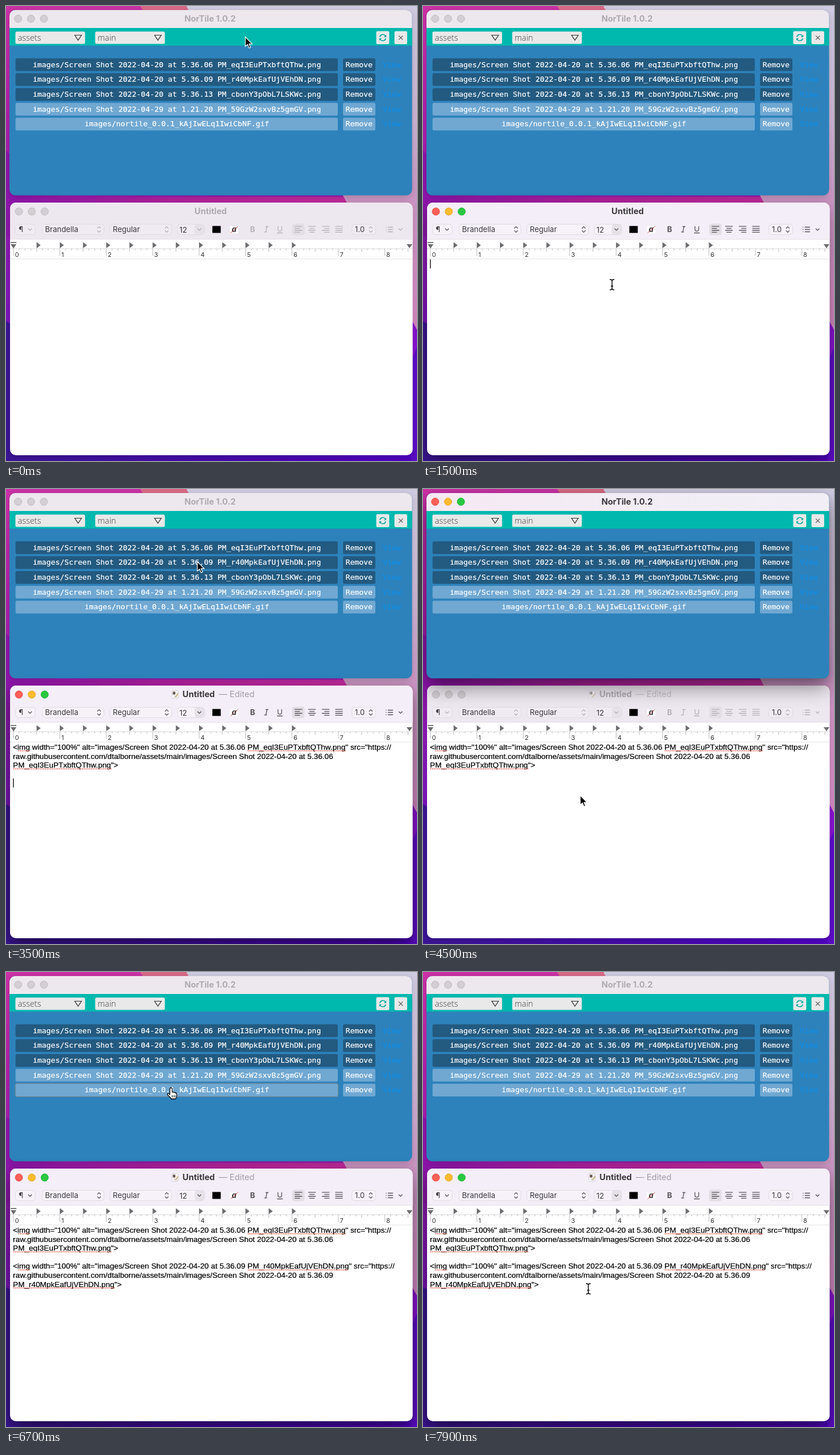
Recreate the animation shown at these times as an HTML page. Size 711x787 px, loop 8 s.

```html
<!DOCTYPE html>
<html lang="en">
<head>
<meta charset="utf-8">
<title>File list and editor</title>
<style>
html, body { margin: 0; width: 100%; height: 100%; overflow: hidden; }
svg { display: block; width: 100vw; height: 100vh; }
text { white-space: pre; }
.ui { font: 13px Inter, sans-serif; fill: #3b383d; }
.title { font: 700 14.5px Inter, sans-serif; fill: #aeaab0; }
.on .title { fill: #3b393d; }
.edited { font: 400 14.6px Inter, sans-serif; fill: #c3bec6; }
.on .edited { fill: #a19ca5; }
.combo { font: 300 14.3px "Open Sans", sans-serif; fill: #3c3c3c; }
.mono { font: 12.95px "DejaVu Sans Mono", monospace; fill: #fff; stroke: #fff; stroke-width: .2; }
.view { fill: #0a90f0; stroke: none; }
.num { font: 11px Inter, sans-serif; fill: #333; }
.doc { font: 13.38px "Liberation Sans", sans-serif; fill: #000; stroke: #000; stroke-width: .22; }
.bar { fill: #ece8ed; }
.on .bar { fill: url(#glass); }
.tools { fill: #ede7f0; }
.on .tools { fill: #f4eef8; }
.light { fill: #d3ced3; stroke: #bcb7bd; stroke-width: .8; }
.on .l0 { fill: #ff5f57; stroke: #e2463f; }
.on .l1 { fill: #febc2e; stroke: #e0a020; }
.on .l2 { fill: #28c840; stroke: #1aab29; }
.box { fill: #f0eaf2; stroke: #e0dae3; }
.on .box { fill: #f7f2fa; }
.pen { fill: none; stroke: #b7b1ba; stroke-width: 1.3; stroke-linecap: round; stroke-linejoin: round; }
.on .pen { stroke: #59555c; }
.bold { font: 700 13px Inter, sans-serif; fill: #b7b1ba; }
.on .bold { fill: #59555c; }
.dots { fill: none; stroke: #ef5d50; stroke-width: 2; stroke-linecap: round; stroke-dasharray: 0 3.05; }
.icon { opacity: .5; }
.on .icon { opacity: 1; }
</style>
</head>
<body>
<svg id="stage" viewBox="0 0 711 787" preserveAspectRatio="none"></svg>
<script>
const stage = document.getElementById('stage');
const LOOP = 8000, STEP = 100;
const LINE = 15.6, TEXT_X = 12.5, BASE = 450.9;

const range = (n, fn) => Array.from({ length: n }, (_, i) => fn(i)).join('');
const rect = (x, y, w, h, fill, r = 0, more = '') =>
  `<rect x="${x}" y="${y}" width="${w}" height="${h}" rx="${r}" fill="${fill}" ${more}/>`;
const box = (x, y, w, h) => `<rect class="box" x="${x}" y="${y}" width="${w}" height="${h}" rx="5"/>`;
const text = (cls, x, y, s, more = '') => `<text class="${cls}" x="${x}" y="${y}" ${more}>${s}</text>`;
const path = (d, more) => `<path d="${d}" ${more}/>`;
const pen = d => path(d, 'class="pen"');
const mid = 'text-anchor="middle"';
const lights = (x, y) => range(3, i => `<circle class="light l${i}" cx="${x + i * 22.3}" cy="${y}" r="6.4"/>`);
const down = (x, y = 386.5) => pen(`M${x - 2.8} ${y - 1.3}l2.8 2.8 2.8-2.8`);
const upDown = x => pen(`M${x - 2.6} 384.2l2.6-2.6 2.6 2.6M${x - 2.6} 388.8l2.6 2.6 2.6-2.6`);

const backdrop = `
<defs>
  <linearGradient id="left" x2="0" y2="1">
    <stop offset="0" stop-color="#cb32a6"/><stop offset=".25" stop-color="#ad1fab"/>
    <stop offset=".42" stop-color="#9a1cb0"/><stop offset=".7" stop-color="#7a14bc"/>
  </linearGradient>
  <linearGradient id="gap" x2="1" y2="0">
    <stop offset="0" stop-color="#8d15ac"/><stop offset=".5" stop-color="#b3229f"/><stop offset="1" stop-color="#c32c9c"/>
  </linearGradient>
  <linearGradient id="right" x2="0" y2="1">
    <stop offset="0" stop-color="#cfcbe0"/><stop offset=".35" stop-color="#cbb2d0"/>
    <stop offset=".6" stop-color="#c994c1"/><stop offset="1" stop-color="#cf84bd"/>
  </linearGradient>
  <linearGradient id="low" x2="1" y2="0">
    <stop offset="0" stop-color="#3b1595"/><stop offset="1" stop-color="#5000c0"/>
  </linearGradient>
  <linearGradient id="glass">
    <stop offset="0" stop-color="#f6e9f4"/><stop offset=".5" stop-color="#f2edf4"/><stop offset="1" stop-color="#f1eff5"/>
  </linearGradient>
  <filter id="blur" x="-20%" y="-30%" width="140%" height="160%"><feGaussianBlur stdDeviation="17"/></filter>
  <filter id="soft" x="-20%" y="-30%" width="140%" height="160%"><feGaussianBlur stdDeviation="6"/></filter>
</defs>
${rect(0, 0, 711, 787, 'url(#left)')}
${path('M0 250L90 330H600V400H0z', 'fill="url(#gap)"')}
${path('M232 0H320L345 60H270z', 'fill="#d96a87"')}
${path('M312 0H711V560L583 328L420 200z', 'fill="url(#right)"')}
${path('M690 520L711 562V787H600z', 'fill="#8412cd"')}
${path('M711 590L690 640V787H711z', 'fill="#5a0cc4"')}
${path('M0 545L40 570L700 700V787H0z', 'fill="url(#low)"')}`;

const shadow = (id, y, h) =>
  rect(7, y + 3, 695, h, '#000', 10, 'opacity=".17" filter="url(#soft)"') +
  rect(7, y + 16, 695, h, '#000', 10, `id="${id}" opacity="0" filter="url(#blur)"`);

// Upper window
const shot = s => `images/Screen Shot 2022-04-${s}.png`;
const files = [
  shot('20 at 5.36.06 PM_eqI3EuPTxbftQThw'),
  shot('20 at 5.36.09 PM_r40MpkEafUjVEhDN'),
  shot('20 at 5.36.13 PM_cbonY3pObL7LSKWc'),
  shot('29 at 1.21.20 PM_59GzW2sxvBz5gmGV'),
  'images/nortile_0.0.1_kAjIwELq1IwiCbNF.gif'
];
const rowY = i => 90.6 + i * 25.65;
const row = (name, i) => {
  const y = rowY(i), fill = i < 3 ? '#235a80' : '#70a8d2';
  return rect(16.5, y, 557.5, 22, fill, 2.5) + rect(583, y, 56, 22, fill, 2.5) +
    text('mono', 295.7, y + 15.2, name, mid) + text('mono', 610.8, y + 15.2, 'Remove', mid) +
    text('mono view', 652, y + 15.2, 'View');
};
const combo = (x, label) => rect(x + .3, 44.3, 120.5, 21.2, '#e9e9e9', 2.5) + text('combo', x + 4.5, 60, label) +
  path(`M${x + 103} 50.5h11.6l-5.8 8.6z`, 'fill="none" stroke="#333" stroke-width="1.2"');
const upper = `
${rect(6, 7, 696.5, 320.5, '#2d82bb', 10)}
${path('M6 38.5V17a10 10 0 0 1 10-10H692.5a10 10 0 0 1 10 10V38.5z', 'class="bar"')}
${rect(6, 38, 696.5, 30.5, '#00b9ae')}
${lights(21, 22)}
${text('title', 353, 27, 'NorTile 1.0.2', mid)}
${combo(16, 'assets')}${combo(154, 'main')}
${rect(640.5, 43.5, 22.5, 22.5, '#e9e9e9', 2.5)}${rect(672, 43.5, 22, 22.5, '#e9e9e9', 2.5)}
${path('M646.6 53.5a5.3 5.3 0 0 1 9.6-1.8M657 56a5.3 5.3 0 0 1-9.6 1.8', 'fill="none" stroke="#00a99f" stroke-width="1.5"')}
${path('M657.8 49.5v4.2h-4.2zM645.8 60v-4.2h4.2z', 'fill="#00a99f"')}
${path('M679.5 51.3l7 7m0-7l-7 7', 'stroke="#555" stroke-width="1.2"')}
${files.map(row).join('')}
${rect(16, 0, 558.5, 23, 'none', 3, 'id="hover" stroke="#7f878d"')}`;

// Editor window
const tick = i => {
  const major = i % 8 === 0, half = i % 4 === 0;
  return `M${(12.8 + i * 10.04).toFixed(1)} 420v${major ? 12 : half ? 5 : 2.5}`;
};
const align = (x, widths, side) => pen(widths.map((w, i) =>
  `M${x + (12 - w) * side} ${381.2 + i * 3.4}h${w}`).join(''));
const ragged = [12, 8, 12, 8];
const note = (n, time, id) => [
  `&lt;img width="100%" alt="images/Screen Shot 2022-04-20 at 5.36.${time} PM_${id}.png" src="https://`,
  `raw.githubusercontent.com/dtalborne/assets/main/images/Screen Shot 2022-04-20 at 5.36.${time}`,
  `PM_${id}.png"&gt;`
].map((s, i) => text('doc', 12, BASE + (n + i) * LINE, s)).join('');
const dots = (n, right, end) => {
  const y = BASE + n * LINE + 1.9;
  return path(`M22 ${y}H42M419 ${y}H${right}M13.5 ${y + 2 * LINE}H${end}`, 'class="dots"');
};
const editor = `
${rect(7, 340, 696.5, 437, '#fff', 10)}
${path('M7 403.5V350a10 10 0 0 1 10-10H693.5a10 10 0 0 1 10 10V403.5z', 'class="tools"')}
${rect(7, 403, 696.5, .8, '#e2dde4')}
${lights(22.3, 355.5)}
<g id="plain">${text('title', 354, 360, 'Untitled', mid)}</g>
<g id="changed">
  <g class="icon">${rect(287, 348.5, 10.5, 13.5, '#fff', 1, 'stroke="#c9c4cb" stroke-width=".8"')}
  ${rect(288.5, 350.5, 4.5, 5, '#6b5b52')}${path('M290 358h6M290 360h6', 'stroke="#b9b4bb" stroke-width=".8"')}
  ${path('M292.5 359l5-6 1.2 1-5 6z', 'fill="#c8a45c"')}</g>
  ${text('title', 305.3, 360, 'Untitled')}${text('edited', 368, 360, '— Edited')}
</g>
${box(16.5, 377.5, 34, 18)}${text('ui', 22, 391, '¶')}${down(41.5)}
${box(62.5, 377.5, 107, 18)}${text('ui', 67.5, 391, 'Brandella')}${upDown(161)}
${box(179.5, 377.5, 107, 18)}${text('ui', 184.8, 391, 'Regular')}${upDown(278)}
${box(296.5, 377.5, 47, 18)}${rect(326.5, 378, 16.5, 17, '#e6e0e9', 4)}${text('ui', 300, 391.5, '12')}${down(334.5)}
${rect(357, 380.5, 14.5, 12, '#000')}
${rect(387.5, 380.5, 14.5, 12.5, '#fff')}${text('ui', 390.5, 391, 'a', 'style="font-weight:700;font-style:italic"')}
${path('M388.5 392.5L401.5 381', 'stroke="#b5413b" stroke-width="1"')}
${text('bold', 426.6, 391, 'B', mid)}
${pen('M449.5 381.5h4M447 390.8h4M451.5 381.5l-2 9.3')}
${pen('M470.5 381.3v5a3.2 3.2 0 0 0 6.4 0v-5M469.5 392.5h8.5')}
${rect(495, 376.5, 21.5, 20, '#e3dde6', 4)}
${align(500, ragged, 0)}${align(523.3, ragged, .5)}${align(547, ragged, 1)}${align(570, [12, 12, 12, 12], 0)}
${box(598.5, 377.5, 41, 18)}${text('ui', 603.5, 391, '1.0')}${upDown(631)}
${pen('M657.5 382.5h.1M657.5 386.5h.1M657.5 390.5h.1M661 382.5h8M661 386.5h8M661 390.5h8')}${down(682.5)}
${path('M7 419.8H703', 'stroke="#cfcfcf" stroke-width=".8"')}
${path(range(69, tick), 'stroke="#a9a9a9" stroke-width=".8"')}
${range(12, i => path(`M${52.9 + i * 40.15} 408.5l7 5.3-7 5.3z`, 'fill="#6e6c70"'))}
${path('M8 408.3h10v1.8h-10zM8 412h10l-5 7.5zM693 412h10l-5 7z', 'fill="#6e6c70"')}
${range(9, i => text('num', 15.4 + i * 80.3, 434, i))}
${rect(7, 437.3, 696.5, .8, '#dcdcdc')}
<g id="note1">${note(0, '06', 'eqI3EuPTxbftQThw')}</g><g id="dots1">${dots(0, 588, 182)}</g>
<g id="note2">${note(4, '09', 'r40MpkEafUjVEhDN')}</g><g id="dots2">${dots(4, 592, 188)}</g>
${rect(0, 0, 1.3, 15.6, '#000', 0, 'id="caret"')}`;

const beam = 'M-4-9q4 0 4 2.5q0-2.5 4-2.5M0-6.5V6.5M-4 9q4 0 4-2.5q0 2.5 4 2.5M-2 2.5h4';
const fist = 'M-2.5 1.5Q-2.5-.8-.6-.8T1.5 1.5V7Q3.5 5.5 4.5 7.5Q6.5 6.5 7.2 8.3Q9.3 8 9.3 10.5V13' +
  'Q9 16 7.5 18.5H0Q-1.5 15.5-4.5 13.5Q-7.5 10.5-6.5 9.3T-2.5 11z';
const pointers = `<g id="pointer">
<g id="arrow">${path('M0 0V16.5L3.8 13.1L6.5 19.3L9.1 18.2L6.5 12.1H11.7z', 'fill="#000" stroke="#fff" stroke-width="1.2"')}</g>
<g id="beam" fill="none">${path(beam, 'stroke="#fff" stroke-width="2.8" opacity=".7"')}${path(beam, 'stroke="#000" stroke-width="1.4"')}</g>
<g id="hand">${path(fist, 'fill="#fff" stroke="#000" stroke-width="1.3" stroke-linejoin="round"')}
${path('M1.5 12v4M4 12v4M6.4 12v4', 'stroke="#000" stroke-width=".9"')}</g>
</g>`;

stage.innerHTML = backdrop +
  `<g id="top">${shadow('topShade', 7, 320.5)}${upper}</g>` +
  `<g id="bottom">${shadow('bottomShade', 340, 437)}${editor}</g>` + pointers;

const $ = id => document.getElementById(id);
const show = (id, on) => $(id).setAttribute('display', on ? 'inline' : 'none');
const within = (t, [a, b]) => t >= a && t < b;
const ease = p => p * p * (3 - 2 * p);

// [start, focused window]
const focus = [[-1000, ''], [400, 'top'], [1400, 'bottom'], [3700, 'top'], [4600, 'bottom'], [6900, 'top'], [7500, 'bottom']];
// [start, end, x, y]: where the pointer travels
const legs = [[1000, 1400, 327, 482], [3000, 3500, 331, 125.5], [4100, 4500, 272, 530], [6200, 6600, 286, 201], [7100, 7500, 286, 548]];
// [from, to, row]
const hovers = [[3600, 4200, 1], [6600, 7200, 4]];
const typing = [[1900, 3100], [5400, 6300]];
// [from, to, line, x]
const carets = [
  [1400, 1900, 0], [1900, 2100, 2, 196], [2100, 2200, 3], [2200, 2800, 4], [3300, 3700, 4],
  [4600, 5100, 4], [5300, 5400, 4], [5400, 5600, 6, 201], [5600, 5700, 7], [5700, 6000, 8], [7500, 7800, 8]
];

function pointerAt(t) {
  let x = 414, y = 53.5;
  for (const [a, b, tx, ty] of legs) {
    const p = ease(Math.min(1, Math.max(0, (t - a) / (b - a))));
    x += (tx - x) * p;
    y += (ty - y) * p;
  }
  return [x, y];
}

let front = 'bottom';
function draw(t) {
  const [since, win] = focus.filter(f => f[0] <= t).pop();
  if ((win || 'bottom') !== front) {
    front = win || 'bottom';
    stage.insertBefore($(front), $('pointer'));
  }
  const strength = Math.min(1, (t - since + STEP) / 300);
  for (const id of ['top', 'bottom']) {
    $(id).setAttribute('class', id === win ? 'on' : '');
    $(id + 'Shade').setAttribute('opacity', id === win ? .42 * strength : 0);
  }

  show('plain', t < 1900);
  show('changed', t >= 1900);
  show('note1', t >= 1900);
  show('dots1', t >= 2700);
  show('note2', t >= 5400);
  show('dots2', t >= 5800);

  const caret = carets.find(c => within(t, c));
  show('caret', caret);
  if (caret) {
    const [, , line, x = TEXT_X] = caret;
    $('caret').setAttribute('x', x - .4);
    $('caret').setAttribute('y', 438.3 + line * LINE);
  }

  const hover = hovers.find(h => within(t, h));
  show('hover', hover);
  if (hover) $('hover').setAttribute('y', rowY(hover[2]) - .5);

  const [x, y] = pointerAt(t);
  const shape = hover ? 'hand' : win === 'bottom' && y > 438 ? 'beam' : 'arrow';
  $('pointer').setAttribute('transform', `translate(${x.toFixed(1)} ${y.toFixed(1)})`);
  show('pointer', !typing.some(s => within(t, s)));
  for (const id of ['arrow', 'beam', 'hand']) show(id, id === shape);
}

const begin = performance.now();
function frame() {
  const t = (performance.now() - begin) % LOOP;
  draw(Math.floor(t / STEP) * STEP);
  requestAnimationFrame(frame);
}
frame();
</script>
</body>
</html>
```
